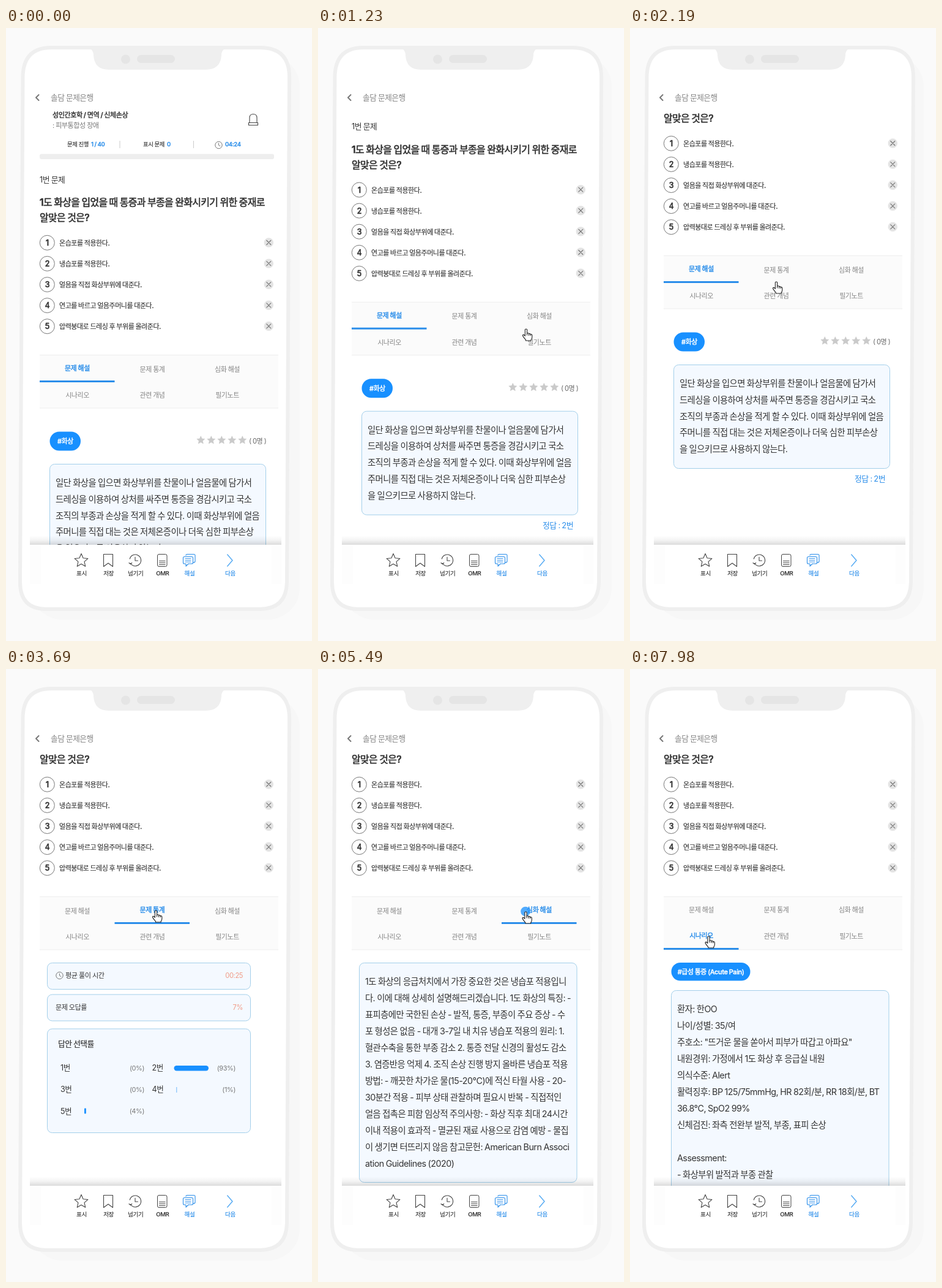
Recreate the animation shown at these times as an HTML page. Size 500x1000 px, loop 8 s.

```html
<!DOCTYPE html>
<html lang="ko">
<head>
<meta charset="utf-8">
<title>문제 해설</title>
<style>
html, body { margin: 0; width: 100%; height: 100%; overflow: hidden; background: #fafafa; }
svg { display: block; width: 500px; height: 1000px; }
text { font-family: Inter, "Noto Sans CJK KR", "Noto Sans CJK", "Noto Sans", sans-serif; letter-spacing: -.04em; word-spacing: -.03em; white-space: pre; stroke-linejoin: round; }
.latin { letter-spacing: -.036em; }
.medium { font-weight: 500; stroke-width: .015em; }
.bold { font-weight: 500; stroke-width: .038em; }
</style>
</head>
<body>
<svg id="stage" viewBox="0 0 500 1000">
  <defs>
    <clipPath id="view"><rect x="39" y="133" width="411" height="710"/></clipPath>
    <linearGradient id="shade" x1="0" y1="0" x2="0" y2="1">
      <stop offset="0" stop-color="#000" stop-opacity="0"/>
      <stop offset=".5" stop-color="#000" stop-opacity=".045"/>
      <stop offset="1" stop-color="#000" stop-opacity=".14"/>
    </linearGradient>
  </defs>
  <g id="phone"></g>
  <g clip-path="url(#view)"><g id="page"></g></g>
  <g id="bars"></g>
  <circle id="ripple" fill="#1890ff"/>
  <g id="hand" fill="#fff" stroke="#222" stroke-width="1.1" stroke-linejoin="round" stroke-linecap="round">
    <path d="M-1.6 1.4Q-1.6 0 0 0T1.6 1.4V7Q4.2 6.2 4.6 7.8Q7 7.2 7.3 8.7Q9.8 8.4 9.8 10.4V13.5Q9.6 16 8.2 17.5V19H-.6V17.6Q-3 15-5.2 11.6Q-6 9.8-4.6 9.4Q-3.2 9.2-1.6 11.4Z"/>
    <path d="M1.6 7V10M4.6 8V10.4M7.3 9V10.8" fill="none"/>
  </g>
</svg>
<script>
const LOOP = 8000;
const INK = '#333', GREY = '#858585', BLUE = '#2b8eea', FILL = '#1890ff';
const TYPE_SCALE = .955;
const byId = id => document.getElementById(id);

function add(parent, tag, attrs = {}) {
  const el = document.createElementNS('http://www.w3.org/2000/svg', tag);
  for (const k in attrs) el.setAttribute(k, attrs[k]);
  parent.appendChild(el);
  return el;
}

// y is the middle of the letters; Latin runs get their own tracking.
function text(parent, x, y, size, str, fill = INK, weight = '', anchor = 'start') {
  const px = size * TYPE_SCALE;
  const el = add(parent, 'text', { x, y: y + px * .37, 'font-size': px, fill, 'text-anchor': anchor, class: weight });
  if (weight) el.setAttribute('stroke', fill);
  for (const run of str.split(/([!-~°]+)/)) {
    if (!run) continue;
    const span = add(el, 'tspan', /[!-~]/.test(run) ? { class: 'latin' } : {});
    span.textContent = run;
  }
}

const rect = (p, x, y, w, h, fill, r = 0, stroke = 'none') =>
  add(p, 'rect', { x, y, width: w, height: h, rx: r, fill, stroke });
const line = (p, d, stroke, width = 1, fill = 'none') =>
  add(p, 'path', { d, stroke, fill, 'stroke-width': width, 'stroke-linecap': 'round', 'stroke-linejoin': 'round' });
const circle = (p, cx, cy, r, fill, stroke = 'none') => add(p, 'circle', { cx, cy, r, fill, stroke });
const card = (p, x, y, w, h) => rect(p, x, y, w, h, '#f4f9ff', 8, '#a3cfea');
const lines = (p, x, y, step, rows) => rows.forEach((s, i) => text(p, x, y + i * step, 15, s));

function star(p, cx, cy, R, r, attrs) {
  const pts = Array.from({ length: 10 }, (_, i) => {
    const a = (i / 5 - .5) * Math.PI, d = i % 2 ? r : R;
    return (cx + d * Math.cos(a)).toFixed(2) + ',' + (cy + d * Math.sin(a)).toFixed(2);
  });
  add(p, 'polygon', { points: pts.join(' '), 'stroke-linejoin': 'round', ...attrs });
}

function clock(p, x, y) {
  circle(p, x, y, 5.7, 'none', '#777');
  line(p, `M${x} ${y - 3}v3.2l2.4 1.4`, '#777');
}

function drawPhone(p) {
  rect(p, 40, 44, 440, 921, '#f7f7f7', 52);
  line(p, 'M74 32H415Q463 32 463 80L459 904Q458 948 414 948H66Q23 948 23 904L27.500 80Q28 32 74 32Z', '#efefef', 6, '#fff');
  line(p, 'M138 33Q144 37 144 44Q145 67 168 67H326Q350 67 351 44Q351 37 357 33Z', '#efefef', 2, '#efefef');
  circle(p, 195.5, 51, 7.5, '#e5e5e5');
  rect(p, 214, 44, 62, 13, '#e5e5e5', 6.5);
}

function drawQuestion(p) {
  text(p, 76, 142, 11.6, '성인간호학 / 면역 / 신체손상', INK, 'bold');
  text(p, 76, 158.500, 11.6, ': 피부통합성 장애', '#777');
  line(p, 'M398 154.500V146.500Q398 140.500 404 140.500T410 146.500V154.500M396.500 154.500H411.500V158.500H396.500Z', '#444', 1.1);
  text(p, 100, 190, 9.9, '문제 진행', INK, 'medium');
  text(p, 139, 189.500, 10, '1 / 40', BLUE, 'bold');
  text(p, 224, 190, 9.9, '표시 문제', INK, 'medium');
  text(p, 263, 189.500, 10, '0', BLUE, 'bold');
  clock(p, 347.5, 191);
  text(p, 358, 189.500, 10, '04:24', BLUE, 'bold');
  rect(p, 185.5, 184, 1, 12, '#ccc');
  rect(p, 306, 184, 1, 12, '#ccc');
  rect(p, 55, 205.5, 383, 8.5, '#eee', 3);

  text(p, 55, 247, 13.4, '1번 문제');
  text(p, 55, 284, 16.7, '1도 화상을 입었을 때 통증과 부종을 완화시키기 위한 중재로', INK, 'bold');
  text(p, 55, 309, 16.7, '알맞은 것은?', INK, 'bold');

  ['온습포를 적용한다.', '냉습포를 적용한다.', '얼음을 직접 화상부위에 대준다.',
   '연고를 바르고 얼음주머니를 대준다.', '압력붕대로 드레싱 후 부위를 올려준다.'].forEach((s, i) => {
    const y = 350.3 + i * 34.1;
    circle(p, 67.3, y, 12, '#fff', '#777');
    text(p, 67.3, y, 13, String(i + 1), INK, 'bold', 'middle');
    text(p, 87, y + .7, 11.5, s, INK, 'medium');
    circle(p, 429.3, y - .3, 7.7, '#e4e4e4');
    line(p, `M425.800 ${y - 3.8}l7 7m0 -7l-7 7`, '#777', 1.2);
  });
}

function drawTabs(p, active) {
  rect(p, 55, 533, 390, 87, '#fbfbfb');
  rect(p, 55, 533, 390, 1, '#eee');
  rect(p, 55, 619.5, 390, 1, '#eee');
  const low = active > 2;
  ['문제 해설', '문제 통계', '심화 해설', '시나리오', '관련 개념', '필기노트'].forEach((s, i) => {
    const on = i === active, row = i > 2 ? 1 : 0;
    const y = (row ? 599 : 556.5) - (low ? 1.5 - row * .5 : 0) - (on ? 1.5 : 0);
    text(p, 116.5 + (i % 3) * 122.5, y, 11.5, s, on ? BLUE : GREY, on ? 'bold' : '', 'middle');
  });
  rect(p, 55 + (active % 3) * 122.5, low ? 617 : 575, 122.5, 3, BLUE);
}

function drawExplain(p) {
  rect(p, 71.5, 658.5, 50.5, 31, FILL, 15.5);
  text(p, 97, 674, 11.5, '#화상', '#fff', 'bold', 'middle');
  for (let i = 0; i < 5; i++)
    star(p, 318.3 + i * 17, 672.5, 6.8, 3.2, { fill: '#cacaca', stroke: '#cacaca', 'stroke-width': .6 });
  text(p, 397, 674, 11.6, '( 0명 )', '#666');
  card(p, 71.5, 711.5, 353, 169);
  lines(p, 81, 741.7, 26.8, [
    '일단 화상을 입으면 화상부위를 찬물이나 얼음물에 담가서',
    '드레싱을 이용하여 상처를 싸주면 통증을 경감시키고 국소',
    '조직의 부종과 손상을 적게 할 수 있다. 이때 화상부위에 얼음',
    '주머니를 직접 대는 것은 저체온증이나 더욱 심한 피부손상',
    '을 일으키므로 사용하지 않는다.']);
  text(p, 367, 897.5, 13.5, '정답 : 2번', BLUE);
}

function drawStats(p) {
  card(p, 67.5, 641.5, 332, 43);
  card(p, 67.5, 693, 332, 43);
  card(p, 67.5, 749, 332, 169.5);
  clock(p, 87.5, 662);
  text(p, 97, 662, 11.7, '평균 풀이 시간', INK);
  text(p, 387, 662, 11.7, '00:25', '#f09a86', '', 'end');
  text(p, 81, 713.5, 11.6, '문제 오답률', INK);
  text(p, 387, 713.5, 11.7, '7%', '#f09a86', '', 'end');
  text(p, 85, 773.5, 13.4, '답안 선택률', INK, 'medium');
  [0, 93, 0, 1, 4].forEach((v, i) => {
    const right = i % 2, y = 812.5 + (i >> 1) * 35.3;
    text(p, right ? 238.5 : 89, y, 13.2, (i + 1) + '번');
    text(p, right ? 375 : 226, y, 11.5, `(${v}%)`, '#777', '', 'end');
  });
  rect(p, 274.5, 809, 56.5, 8.5, FILL, 4.2);
  rect(p, 278.3, 844, 1, 9, '#6db7fa');
  rect(p, 128, 878.5, 2.8, 9, FILL, 1);
}

function drawDeep(p) {
  card(p, 67.5, 641.5, 355.5, 358);
  lines(p, 77, 672, 26.93, [
    '1도 화상의 응급처치에서 가장 중요한 것은 냉습포 적용입니',
    '다. 이에 대해 상세히 설명해드리겠습니다. 1도 화상의 특징: -',
    '표피층에만 국한된 손상 - 발적, 통증, 부종이 주요 증상 - 수',
    '포 형성은 없음 - 대개 3-7일 내 치유 냉습포 적용의 원리: 1.',
    '혈관수축을 통한 부종 감소 2. 통증 전달 신경의 활성도 감소',
    '3. 염증반응 억제 4. 조직 손상 진행 방지 올바른 냉습포 적용',
    '방법: - 깨끗한 차가운 물(15-20°C)에 적신 타월 사용 - 20-',
    '30분간 적용 - 피부 상태 관찰하며 필요시 반복 - 직접적인',
    '얼음 접촉은 피함 임상적 주의사항: - 화상 직후 최대 24시간',
    '이내 적용이 효과적 - 멸균된 재료 사용으로 감염 예방 - 물집',
    '이 생기면 터뜨리지 않음 참고문헌: American Burn Associ',
    'ation Guidelines (2020)']);
}

function drawScenario(p) {
  rect(p, 67.5, 641, 129, 29.5, FILL, 14.7);
  text(p, 132, 656, 11.5, '#급성 통증 (Acute Pain)', '#fff', 'bold', 'middle');
  card(p, 67.5, 686.5, 355.5, 400);
  lines(p, 77, 716.7, 26.95, [
    '환자: 한OO',
    '나이/성별: 35/여',
    '주호소: "뜨거운 물을 쏟아서 피부가 따갑고 아파요"',
    '내원경위: 가정에서 1도 화상 후 응급실 내원',
    '의식수준: Alert',
    '활력징후: BP 125/75mmHg, HR 82회/분, RR 18회/분, BT',
    '36.8°C, SpO2 99%',
    '신체검진: 좌측 전완부 발적, 부종, 표피 손상',
    '',
    'Assessment:',
    '- 화상부위 발적과 부종 관찰']);
}

function drawBars(p) {
  line(p, 'M53.500 109L49 113.500L53.500 118', '#777', 2);
  text(p, 73, 113, 13.3, '솔담 문제은행', GREY);

  rect(p, 39, 828, 411, 15, 'url(#shade)');
  rect(p, 39, 843, 411, 64, '#fdfdfd');
  rect(p, 57, 843, 377, 64, '#fff');
  const ink = '#444';
  star(p, 123, 869, 11.5, 5.3, { fill: 'none', stroke: ink, 'stroke-width': 1.1 });
  line(p, 'M159.500 858.500H174.500V878.500L167 873L159.500 878.500Z', ink, 1.1);
  line(p, 'M202.300 866A9.300 9.300 0 1 1 203.500 873.500M201 872.500L203.300 874.500L205.800 872.500M211 863V869H215.500', ink, 1.1);
  rect(p, 247.5, 858.5, 15.5, 20, 'none', 2.5, ink);
  line(p, 'M250.500 869.500H260M250.500 872.500H260M250.500 875.500H260', ink, 1.1);
  line(p, 'M294 860.500Q294 858.500 296 858.500H307Q309 858.500 309 860.500V870Q309 872 306 872', BLUE, 1.1);
  line(p, 'M291.500 862.500H303.500Q305.500 862.500 305.500 864.500V872Q305.500 874 303.500 874H298L294 878V874H291.500Q289.500 874 289.500 872V864.500Q289.500 862.500 291.500 862.500Z', BLUE, 1.1, '#fff');
  line(p, 'M293 865.500H302M293 868.300H302M293 871H302', BLUE, .9);
  line(p, 'M361.800 859L370 868.500L361.800 878', '#58acf3', 1.5);
  ['표시', '저장', '넘기기', 'OMR', '해설'].forEach((s, i) =>
    text(p, 123.5 + i * 44.1, 889.5, 10, s, i === 4 ? BLUE : INK, 'medium', 'middle'));
  text(p, 366.5, 889.5, 10, '다음', BLUE, 'medium', 'middle');
}

// Time tables: [ms, values...]
const SCROLL = [[300, 0], [580, 86.3], [1340, 86.3], [1620, 162]];
const HAND = [[600, 348, 530], [1150, 340, 491], [1300, 340, 491], [2150, 239, 414], [2400, 239, 414],
  [2850, 245, 394], [4550, 245, 394], [5250, 339.5, 396], [5950, 339.5, 396],
  [6950, 153, 425], [7100, 153, 425], [7350, 128.5, 436]];
const CLICKS = [3000, 5380, 7420];

const ease = u => u * u * (3 - 2 * u);
function at(table, t) {
  const i = table.findIndex(k => k[0] > t);
  if (i === 0) return table[0].slice(1);
  if (i < 0) return table[table.length - 1].slice(1);
  const a = table[i - 1], b = table[i], u = ease((t - a[0]) / (b[0] - a[0]));
  return a.slice(1).map((v, n) => v + (b[n + 1] - v) * u);
}

drawPhone(byId('phone'));
const page = byId('page');
drawQuestion(page);
const panes = [drawExplain, drawStats, drawDeep, drawScenario].map((draw, i) => {
  const g = add(page, 'g');
  drawTabs(g, i);
  draw(g);
  return g;
});
drawBars(byId('bars'));

function render(t) {
  page.setAttribute('transform', `translate(0 ${-at(SCROLL, t)[0]})`);
  const shown = CLICKS.filter(c => t >= c).length;
  panes.forEach((g, i) => g.setAttribute('display', i === shown ? 'inline' : 'none'));

  const [x, y] = at(HAND, t);
  byId('hand').setAttribute('transform', `translate(${x} ${y})`);
  byId('hand').setAttribute('display', t < HAND[0][0] ? 'none' : 'inline');

  const age = shown ? (t - CLICKS[shown - 1]) / 260 : 1;
  const ripple = byId('ripple');
  ripple.setAttribute('cx', x - .5);
  ripple.setAttribute('cy', y - .5);
  ripple.setAttribute('r', 4 + 9 * Math.min(age, 1));
  ripple.setAttribute('opacity', age < 1 ? .75 * Math.min(1, 2 - 2 * age) : 0);
}

const start = performance.now();
function tick() {
  render((performance.now() - start) % LOOP);
  requestAnimationFrame(tick);
}
render(0);
requestAnimationFrame(tick);
</script>
</body>
</html>
```
